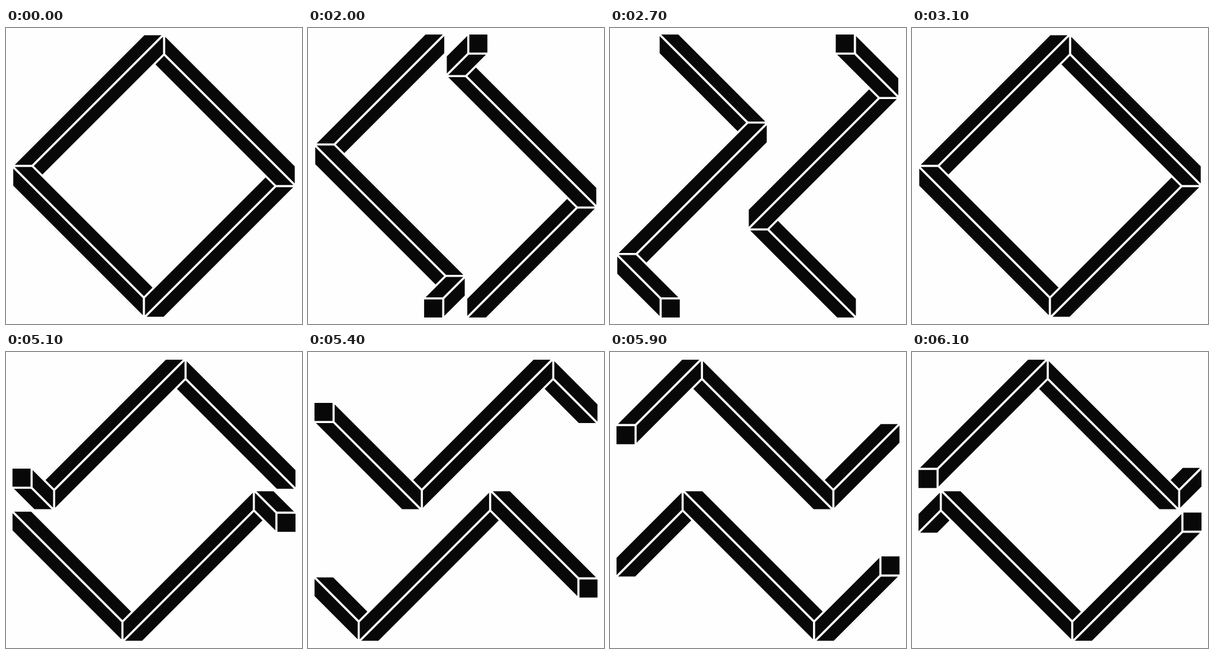
Recreate the animation shown at these times as an HTML page with a canvas. Size 500 by 500 pixels, loop 6200 ms.

```html
<!DOCTYPE html>
<html>
<head>
<meta charset="utf-8">
<style>
  html, body { margin: 0; width: 100%; height: 100%; overflow: hidden; background: #fefefe; }
  canvas { display: block; }
</style>
</head>
<body>
<canvas width="500" height="500"></canvas>
<script>
const ctx = document.querySelector('canvas').getContext('2d');
const PAPER = '#fefefe', INK = '#080808';
const LOOP = 6200, HOLD = 2000, SLIDE_END = 3100, STEP_MS = 100, STEP_PX = 37;
const SIDE = 34, HALF = 222, PERIOD = 2 * HALF;
const LEFT = 10.5, TOP = 9.3, BOTTOM = 456.8, CORNER_Y = 233.7;
const PAIR_X = 249.6; // the two zigzags mirror each other about this point

function face(...points) {
  ctx.beginPath();
  points.forEach(([x, y]) => ctx.lineTo(x, y));
  ctx.closePath();
  ctx.fill();
  ctx.stroke();
}

// Square beam swept downwards from corner (ax, ay) to (bx, by).
function beam([ax, ay], [bx, by]) {
  const e = bx > ax ? 0 : SIDE;
  face([ax + e, ay], [ax + e, ay + SIDE], [bx + e, by + SIDE], [bx + e, by]);
  face([ax, ay], [ax + SIDE, ay], [bx + SIDE, by], [bx, by]);
}

function rotated(quarters, draw, pivotX = 250) {
  ctx.save();
  ctx.translate(pivotX, 250);
  ctx.rotate(quarters * Math.PI / 2);
  ctx.translate(-pivotX, -250);
  draw();
  ctx.restore();
}

function zigzag(shift) {
  const corner = CORNER_Y - shift;
  const at = y => {
    const d = ((y - corner) % PERIOD + PERIOD) % PERIOD;
    return [LEFT + Math.min(d, PERIOD - d), y];
  };
  const stops = [TOP];
  for (let y = corner; y < BOTTOM; y += HALF) if (y > TOP) stops.push(y);
  stops.push(BOTTOM);
  for (let i = 1; i < stops.length; i++) beam(at(stops[i - 1]), at(stops[i]));
  const [x, y] = at(BOTTOM);
  face([x, y], [x + SIDE, y], [x + SIDE, y + SIDE], [x, y + SIDE]);
}

function zigzagPair(shift) {
  zigzag(shift);
  rotated(2, () => zigzag(shift), PAIR_X);
}

// Four beams, each overlapping the previous one all the way round.
function diamond() {
  const edge = () => beam([LEFT, 233], [233, 455.5]);
  for (let q = 0; q < 4; q++) rotated(-q, edge);
  ctx.save();
  ctx.beginPath();
  ctx.rect(0, 0, 125, 500);
  ctx.clip();
  edge();
  ctx.restore();
}

function frame(now) {
  const t = now % LOOP, half = t % SLIDE_END;
  ctx.fillStyle = PAPER;
  ctx.fillRect(0, 0, 500, 500);
  ctx.fillStyle = INK;
  ctx.strokeStyle = PAPER;
  ctx.lineWidth = 3.5;
  ctx.lineJoin = 'round';
  if (half < HOLD) {
    diamond();
  } else {
    const shift = STEP_PX * (Math.floor((half - HOLD) / STEP_MS) + 1);
    rotated(t < SLIDE_END ? 0 : -1, () => zigzagPair(shift));
  }
  requestAnimationFrame(frame);
}
frame(0);
</script>
</body>
</html>
```
